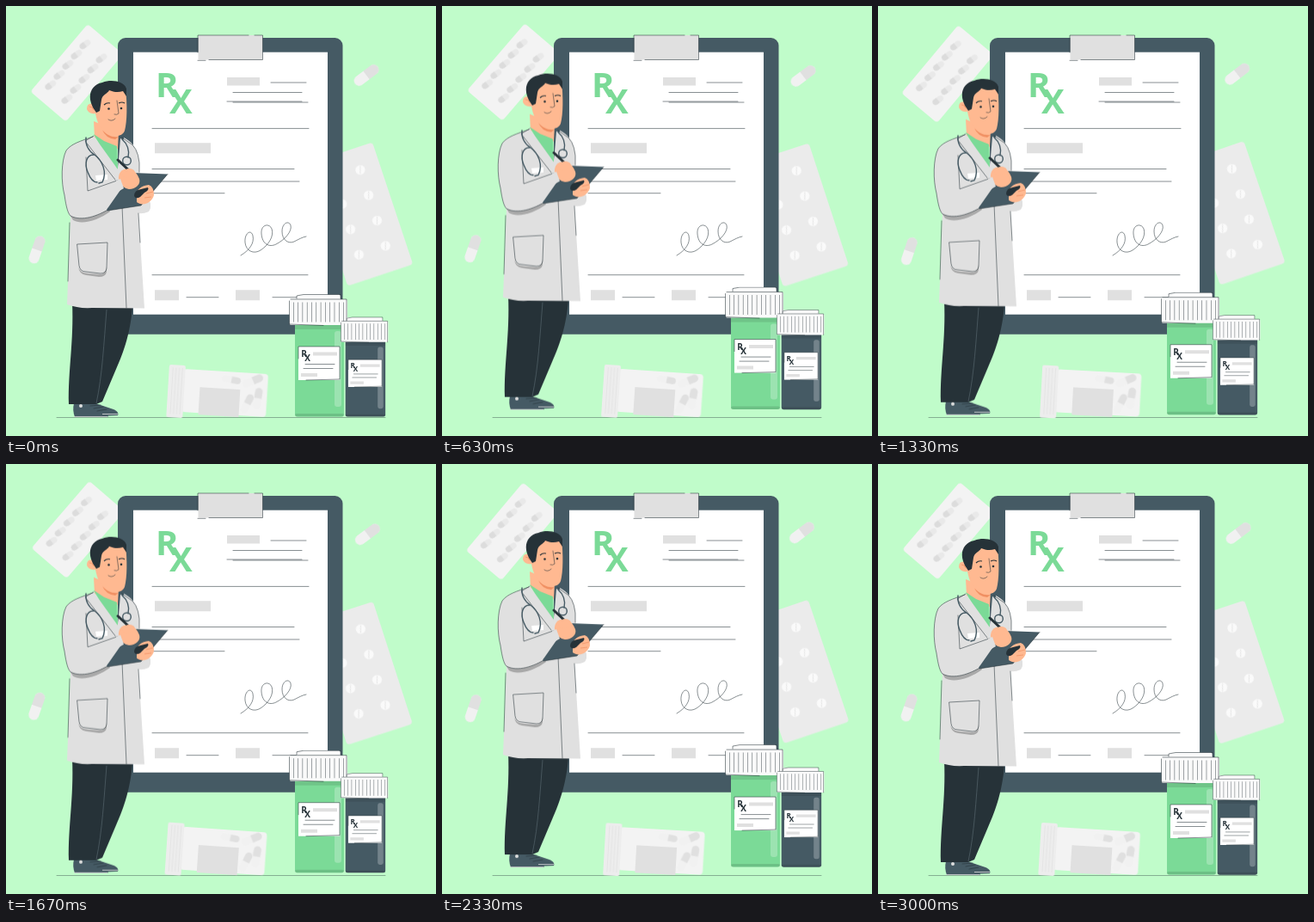
An HTML page without scripts for the animation above (3040 ms loop, 500x500 px).

```html
<!DOCTYPE html>
<html lang="en">
<head>
<meta charset="utf-8">
<title>Prescription</title>
<style>
html, body { margin: 0; height: 100%; overflow: hidden; background: #c0fcca; }
svg { display: block; width: 100vw; height: 100vh; }
.float { animation: float 3.04s linear infinite; }
.sway { transform-origin: 250px 250px; animation: sway 3.04s linear infinite; }
/* two 1.5 s cycles, then a short rest */
@keyframes float {
  0%, 49.342%, 98.684%, 100% { transform: translateY(0); }
  24.671%, 74.013% { transform: translateY(-10px); }
}
@keyframes sway {
  0%, 49.342%, 98.684%, 100% { transform: rotate(0deg); }
  12.336%, 61.678% { transform: rotate(1deg); }
  37.007%, 86.349% { transform: rotate(-1deg); }
}
.rx { font: 700 40px "Open Sans", "Noto Sans", sans-serif; }
.line { fill: none; stroke: #263238; stroke-width: .55; stroke-linecap: round; stroke-linejoin: round; }
.grey { fill: #e0e0e0; }
.slate { fill: #455a64; }
.skin { fill: #ffb991; }
.ink { fill: #263238; }
</style>
</head>
<body>
<svg viewBox="0 0 500 500">
  <defs>
    <g id="rx" class="rx">
      <text x="-3" y="28.500">R</text>
      <text x="13" y="48">X</text>
    </g>
    <g id="cap">
      <rect x="-16.500" y="-6" width="33" height="12" rx="6" fill="#f1f1f1"/>
      <path class="grey" d="M0-6H10.500a6 6 0 0 1 0 12H0Z"/>
    </g>
    <g id="pill">
      <rect x="-7" y="-3.500" width="14" height="7" rx="3.500" fill="#e9e9e9"/>
      <path fill="#dcdcdc" d="M0-3.500H-3.500a3.500 3.500 0 0 0 0 7H0Z"/>
    </g>
    <g id="pair"><use href="#pill" transform="translate(13 20) rotate(-76)"/><use href="#pill" transform="translate(38 20) rotate(-76)"/></g>
    <g id="tab">
      <circle r="5.600" fill="#fafafa"/>
      <path d="M-1.500 4.500L1.500-4.500" stroke="#e0e0e0" stroke-width=".8"/>
    </g>
    <g id="tabs"><use href="#tab" x="-23.500" y="26"/><use href="#tab" x="-56" y="26"/></g>
    <g id="bottle">
      <rect x="7" y="33" width="57" height="109.500" rx="3" fill="currentColor"/>
      <rect x="7" y="35" width="57" height="6" fill="#000" opacity=".1"/>
      <rect x="53" y="43" width="8" height="88" rx="3" fill="#fff" opacity=".25"/>
      <rect x="7" y="139" width="57" height="3.500" rx="1.700" fill="#000" opacity=".12"/>
      <rect x="9" y=".5" width="51" height="8" rx="2" fill="#fafafa"/>
      <path class="line" d="M9 5V2L17 .5H60V5"/>
      <rect x=".5" y="6" width="67.500" height="30" rx="2" fill="#fafafa"/>
      <path d="M5 21H66" stroke="#263238" stroke-width="23" stroke-dasharray=".55 4.750" opacity=".8"/>
      <path class="line" d="M2 6H67V36M.5 8V35L40 36.500"/>
      <rect x="11" y="61" width="48" height="39" fill="#fff"/>
      <path class="line" d="M11 75V61H59V99L20 100"/>
      <use href="#rx" class="ink" transform="translate(15 66) scale(.25)"/>
      <path d="M28 69.500H56M14 94H33" stroke="#e0e0e0" stroke-width="4"/>
      <path class="line" d="M19 81.500H53M17 86.500H51"/>
    </g>
  </defs>

  <rect width="500" height="500" fill="#c0fcca"/>
  <path class="line" d="M59 478.500H441" opacity=".7"/>

  <g class="sway">
    <g transform="translate(95 21) rotate(40.300)">
      <rect width="54" height="103" rx="4" fill="#f3f3f3"/>
      <use href="#pair"/><use href="#pair" y="15.500"/><use href="#pair" y="31"/><use href="#pair" y="46.500"/><use href="#pair" y="62"/>
    </g>
    <g transform="translate(426 158.500) rotate(-18.400)">
      <rect x="-80" width="80" height="149.500" rx="4" fill="#ebebeb"/>
      <use href="#tabs"/><use href="#tabs" y="31"/><use href="#tabs" y="62"/><use href="#tabs" y="93"/>
    </g>
    <use href="#cap" transform="translate(419 80.500) rotate(-37)"/>
    <use href="#cap" transform="translate(36 283.500) rotate(-71)"/>
    <g transform="translate(190 417) rotate(3.500)">
      <rect x="17" y="4" width="98.500" height="50" rx="4" fill="#f3f3f3"/>
      <rect width="19" height="61" rx="2" fill="#ededed"/>
      <path d="M4 30H17" stroke="#dedede" stroke-width="54" stroke-dasharray=".6 3.200"/>
      <rect x="37" y="24" width="47" height="32" class="grey"/>
      <g stroke="#f3f3f3" stroke-width=".6">
        <use href="#cap" transform="translate(73 13) rotate(8) scale(.68)"/>
        <use href="#cap" transform="translate(98 13) rotate(-26) scale(.78)"/>
        <use href="#cap" transform="translate(105 33) rotate(-84) scale(.76)"/>
        <use href="#cap" transform="translate(93 40) rotate(-66) scale(.74)"/>
      </g>
    </g>
  </g>

  <!-- clipboard -->
  <rect x="130" y="37" width="261.500" height="344.800" rx="9" class="slate"/>
  <rect x="148" y="53.700" width="226" height="305" fill="#fff"/>
  <rect x="223.500" y="34" width="75" height="28.500" rx="1" class="grey"/>
  <path class="line" d="M223 54V34H282M289 34H298.500V62.500H236M232 63.300H223"/>
  <use href="#rx" fill="#7bda97" transform="translate(177 77)"/>
  <path class="grey" d="M257 83h38v9.500h-38ZM173 159.300h65v12h-65ZM173 330.300h28v12h-28ZM267 330.300h28v12h-28Z"/>
  <path class="line" d="M308 89H349M264 100.500H344M257 111H344M264 112H351M170 142.400H352M170 189.500H335M170 204H341M170 217.700H254M170 312.700H351M210 338.700H247M310 338.700H345"/>
  <path class="line" d="M273 290C283 284 289 276 287 267C285 259 277 264 278 275C279 285 288 289 296 284C305 278 312 268 309 259C306 252 296 254 297 265C298 277 306 281 314 277C324 272 333 262 331 255C329 249 321 252 321 262C321 272 328 277 335 274C341 271 344 269 349 268"/>

  <g class="float">
    <use href="#bottle" x="329" y="335" color="#7bda97"/>
    <use href="#bottle" transform="translate(389 361.500) scale(.815)" color="#455a64"/>

    <!-- doctor -->
    <g>
      <path class="slate" d="M79 462H104L125 469C130 471 131 474 130 476L80 478Q77 470 79 462Z"/>
      <path class="slate" d="M80 463H100L117 473Q120 476 118 478H80Z"/>
      <path d="M79 477.500H118M112 474.500H130" stroke="#ddd" stroke-width=".8"/>
      <path class="line" d="M98 465L110 464M102 468L113 466M106 471L117 469"/>
      <circle cx="87" cy="465" r="2" fill="#ddd"/>
      <path class="ink" d="M77 345H147.500C145 380 137 402 128.500 421L112 460L105 463L73 463C72 425 79 390 77 345Z"/>
      <path d="M117 353C114 390 112 430 105 462" fill="none" stroke="#56666e" stroke-width=".7"/>

      <path class="skin" d="M102 134L131 146L130 166L103 153Z"/>
      <path class="grey" d="M101 152C87 157 76 160 70 168C64 180 64 205 68 220C70 234 72 241 75 245L71 347Q84 352 100 351L161 351.500L154 241C162 242 169 239 168 230L155 192C157 174 150 159 137 153L130 188L110 162Z"/>
      <path fill="#7bda97" d="M102 149L114 157L129 163L130 189L127 194Z"/>
      <path fill="#f08f62" d="M112 144C117 150 123 153 131 152L127 155Q116 154 112 144Z"/>

      <path class="skin" d="M106 96L139 94C141 115 141 134 138 145C135 153 124 152 117 148C110 144 106 136 104 125Q96 126 94 120Q94 112 102 114Z"/>
      <path class="ink" d="M105 124L101 118L99 113C95 101 101 91 112 89C122 85 137 87 140 96V105L136 99C130 101 125 100 120 98C118 102 112 103 111 109L109 122Z"/>
      <path class="line" stroke-width=".9" d="M129 110L131 125Q129 127 126 126M119 132Q123 135 127 131"/>
      <path d="M114 115Q117 112 121 113M131 113Q135 111 138 113" fill="none" stroke="#263238" stroke-width="1.200"/>
      <circle cx="119.500" cy="119.500" r="1.300" class="ink"/><circle cx="134" cy="119" r="1.300" class="ink"/>
      <path d="M97 117Q101 117 102 121" fill="none" stroke="#f08f62" stroke-width=".8"/>

      <path class="grey" d="M102 151L92 157L128 203L130 190Z"/>
      <path class="grey" d="M133 154L141 158L150 180L130 190Z"/>
      <path fill="#a9a9a9" d="M75 244C88 251 107 244 120 236L121 239C108 249 88 255 78 249Z"/>
      <path class="line" d="M101 152C87 157 76 160 70 168C64 180 64 205 68 220C70 234 72 241 75 244C88 251 107 244 120 236M93 176L95 215L132 202M102 151L92 157L127 202M135 153L142 158Q153 163 155 182V193M135 232L140 351M74 252L72 320M154 241L156 275"/>
      <path fill="#a9a9a9" d="M84 303Q85 310 96 311L111 312Q116 311 117 303V309Q116 315 108 315L93 313Q85 312 84 303Z"/>
      <path class="line" d="M83 277L118 275L117 305Q116 311 110 311L93 309Q86 309 85 302Z"/>
      <path fill="#fff" d="M104 197L118 196V202L105 203Z"/>
      <g fill="none" stroke="#455a64" stroke-width="1.400" stroke-linecap="round">
        <path d="M93 153C92 161 96 169 103 173C112 180 118 193 112 205L108 206M103 173C93 172 91 184 95 193C98 201 102 205 106 205M135 155C141 160 144 168 142 176"/>
        <circle cx="140.500" cy="180" r="4.800"/>
      </g>

      <path class="grey" d="M151 228L166 225Q170 234 166 239Q160 242 153 240Z"/>
      <path class="slate" d="M147 194L188 195.500L157 232L118 238Q116 237 119 234Z"/>
      <path class="line" d="M188 195.500L157 232L118 238"/>
      <path class="skin" d="M131 202C130 192 137 187 146 190Q152 193 155 201C157 207 151 213 143 213Q135 212 131 202Z"/>
      <path d="M130 179L145 193" stroke="#263238" stroke-width="3" stroke-linecap="round"/>
      <path class="skin" d="M134 194Q142 186 149 191L151 197L138 200Z"/>
      <path class="grey" d="M128 203L133 201L137 212L130 216Z"/>
      <path class="skin" d="M152 223C150 213 158 209 166 208Q172 210 172 220C169 230 158 233 152 228Z"/>
      <path class="ink" d="M149 221Q149 214 157 213L165 211Q167 214 161 217L156 222Q151 225 149 221Z"/>
      <path d="M163 218L171 216M161 223L169 222" fill="none" stroke="#f08f62" stroke-width=".7"/>
    </g>
  </g>
</svg>
</body>
</html>
```
